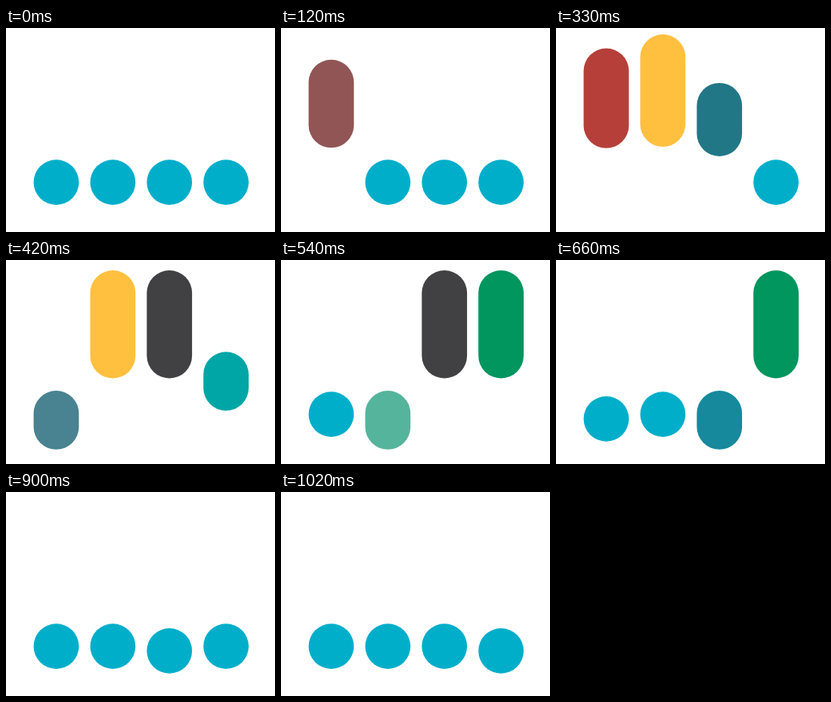
Recreate the animation shown at these times as an HTML page. Size 337 px wide and 256 px high, loop 1.05 s.

```html
<!DOCTYPE html>
<html lang="en">
<head>
<meta charset="utf-8">
<title>Bouncing pills</title>
<style>
  html, body { margin: 0; width: 100%; height: 100%; overflow: hidden; background: #fff; }
  svg { display: block; width: 100%; height: 100%; }
</style>
</head>
<body>
<svg id="stage" viewBox="0 0 337 256"></svg>
<script>
const LOOP = 1050;
const STEP = 30;
const STAGGER = 4; // steps between neighbouring pills
const SIZE = 56.7;
const STRETCH = 86;
const REST = 165.3;
const CYAN = [0, 174, 202];
const ACCENTS = [[218, 41, 28], [255, 192, 63], [65, 64, 66], [0, 150, 94]];

// Ease with horizontal handles x1 and x2, solved by bisection.
function ease(x1, x2) {
  return x => {
    let low = 0, high = 1;
    for (let i = 0; i < 24; i++) {
      const s = (low + high) / 2, r = 1 - s;
      if (3 * r * r * s * x1 + 3 * r * s * s * x2 + s * s * s < x) low = s;
      else high = s;
    }
    return low * low * (3 - 2 * low);
  };
}

const linear = x => x;
const rise = ease(0.33, 0.2);
const fall = ease(0.88, 0.19);
const settle = ease(0.33, 0.67);
const grow = ease(0.33, 0.47);
const shrink = x => 1 - grow(1 - x);

// Each key is [step, value, easing that leads to it].
const topKeys = [
  [0, REST], [8, 6.7, rise], [16, 172, fall],
  [18, REST, settle], [22, 171, settle], [26, REST, settle]
];
const stretchKeys = [[0, 0], [8, 1, grow], [16, 0, shrink]];
const tintKeys = [[0, 0], [6, 1, linear], [10, 1, linear], [16, 0, linear]];

function valueAt(keys, time) {
  if (time <= keys[0][0]) return keys[0][1];
  for (let i = 1; i < keys.length; i++) {
    const [start, from] = keys[i - 1];
    const [end, to, curve] = keys[i];
    if (time < end) return from + (to - from) * curve((time - start) / (end - start));
  }
  return keys[keys.length - 1][1];
}

const pills = ACCENTS.map((accent, i) => {
  const rect = document.createElementNS("http://www.w3.org/2000/svg", "rect");
  rect.setAttribute("x", 34.6 + 70.9 * i);
  rect.setAttribute("width", SIZE);
  rect.setAttribute("rx", SIZE / 2);
  document.getElementById("stage").append(rect);
  return { rect, accent };
});

function draw(ms) {
  const step = Math.floor((ms % LOOP) / STEP);
  pills.forEach(({ rect, accent }, i) => {
    const time = step - i * STAGGER;
    const tint = valueAt(tintKeys, time);
    const color = CYAN.map((c, j) => Math.round(c + (accent[j] - c) * tint));
    rect.setAttribute("y", valueAt(topKeys, time));
    rect.setAttribute("height", SIZE + STRETCH * valueAt(stretchKeys, time));
    rect.setAttribute("fill", `rgb(${color})`);
  });
}

const start = performance.now();
function tick() {
  draw(performance.now() - start);
  requestAnimationFrame(tick);
}
tick();
</script>
</body>
</html>
```
